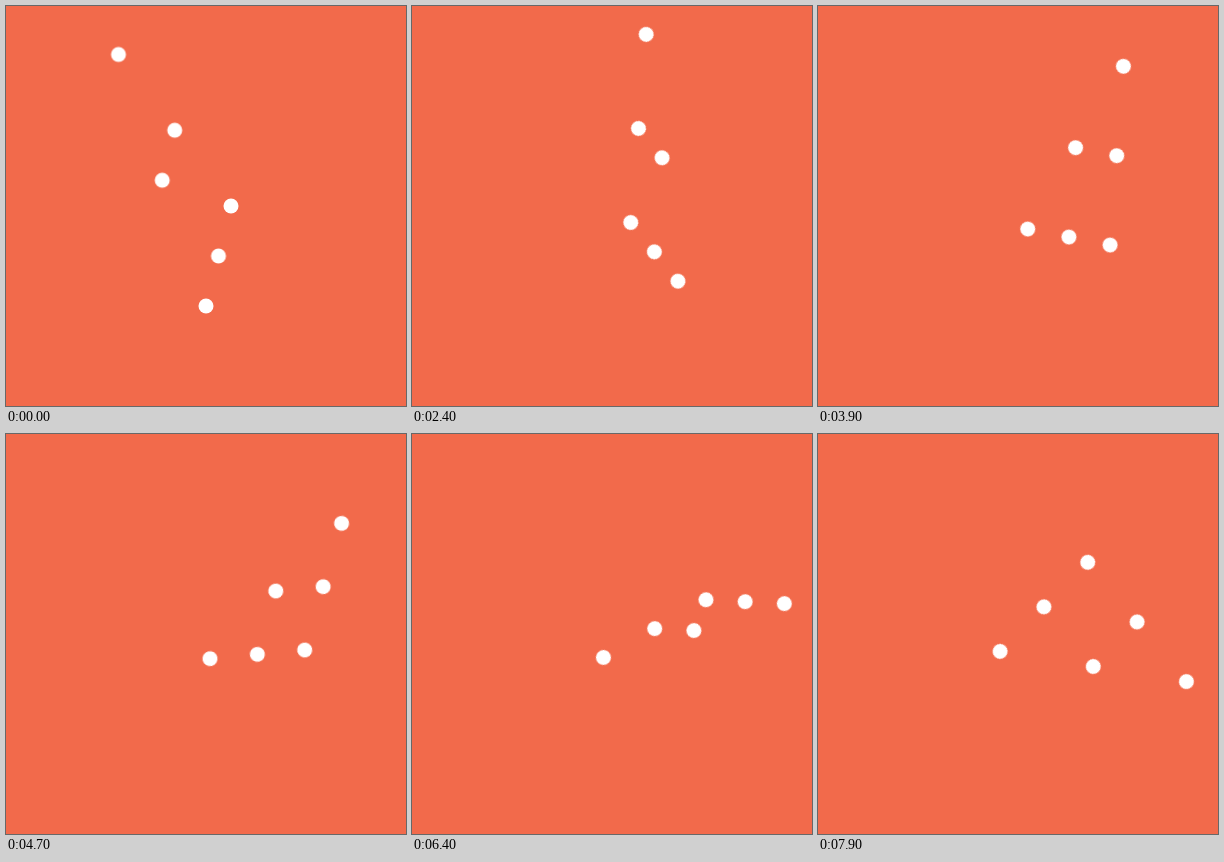
An HTML page for the animation above (8000 ms loop, 400 by 400 pixels).

```html
<!DOCTYPE html>
<html lang="en">
<head>
<meta charset="utf-8">
<title>Six orbiting dots</title>
<style>
  html, body {
    margin: 0;
    width: 100%;
    height: 100%;
    overflow: hidden;
    background: #f26a4b;
  }
  svg {
    display: block;
    width: 100%;
    height: 100%;
  }
  /* Each dot sums a clockwise arm (ax, ay) and a counter-clockwise arm (b). */
  circle {
    --ax: 0px;
    --ay: 0px;
    --b: 0px;
    r: 7.5px;
    fill: #fff;
    transform-origin: 0 0;
    animation: orbit 8s steps(80) -1ms infinite;
  }
  @keyframes orbit {
    from {
      transform: rotate(0rad) translate(var(--ax), var(--ay)) rotate(0rad) translate(0px, var(--b));
    }
    to {
      transform: rotate(2.4rad) translate(var(--ax), var(--ay)) rotate(-4.8rad) translate(0px, var(--b));
    }
  }
  /* Three corners */
  .outer { --ax: -87.5px; --ay: -151.554px; }
  .inner { --ax: 25px; }
  .counter { --b: 100px; }
  /* Midpoints of the three sides */
  .outer-inner { --ax: -31.25px; --ay: -75.777px; }
  .outer-counter { --ax: -43.75px; --ay: -75.777px; --b: 50px; }
  .inner-counter { --ax: 12.5px; --b: 50px; }
</style>
</head>
<body>
<svg viewBox="-200 -200 400 400">
  <circle class="outer" r="7.5"/>
  <circle class="inner" r="7.5"/>
  <circle class="counter" r="7.5"/>
  <circle class="outer-inner" r="7.5"/>
  <circle class="outer-counter" r="7.5"/>
  <circle class="inner-counter" r="7.5"/>
</svg>
</body>
</html>
```
